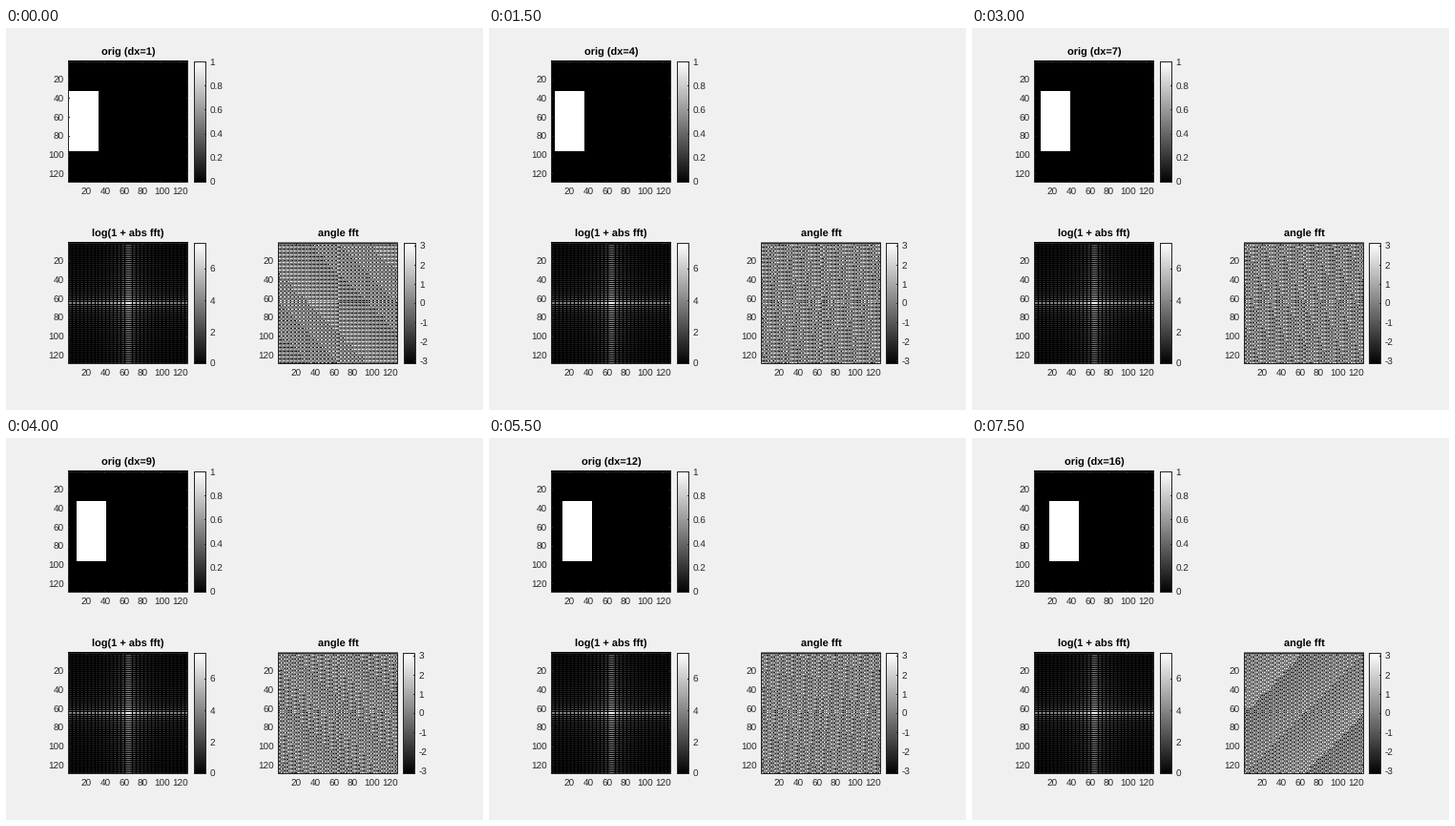
These frames come from a looping animation (500 px wide and 400 px high, 8 s). A matplotlib script:

```python
import numpy as np
import matplotlib.pyplot as plt
from matplotlib.animation import FuncAnimation

W, H, N = 500, 400, 128
STEPS, STEP_MS = 16, 500
PANEL_W, PANEL_H = 125, 126  # distance between border lines
BAR_W = 12
CELL_X, CELL_Y = 126 / N, 126.3 / N
INK = "0.15"
PT = 0.72  # points per pixel at 100 dpi

plt.rcParams.update({"font.family": "Liberation Sans", "path.snap": False,
                     "text.hinting": "none"})

fig = plt.figure(figsize=(W / 100, H / 100), dpi=100, facecolor="#f0f0f0")
ax = fig.add_axes([0, 0, 1, 1])
ax.axis("off")


def label(x, y, text, size=10, **kw):
    kw.setdefault("color", INK)
    return ax.text(x, y, text, fontsize=size * PT, va="baseline", **kw)


def line(xs, ys):
    return ax.plot(xs, ys, color=INK, lw=PT, solid_capstyle="butt",
                   solid_joinstyle="miter", zorder=3)[0]


def center(v):
    """Middle of the pixel that holds v."""
    return np.floor(v) + 0.5


def frame(x, y, w, h):
    xs = np.array([x, x + w, x + w, x, x]) + 0.5
    ys = np.array([y, y, y + h, y + h, y]) + 0.5
    return line(xs, ys)


def image(data, x, y, w, h, lo, hi):
    return ax.imshow(data, cmap="gray", vmin=lo, vmax=hi, aspect="auto",
                     interpolation="nearest", extent=(x, x + w, y + h, y))


def panel(x, y, title, lo, hi):
    """Image axes with title and tick labels; returns image and title."""
    img = image(np.zeros((N, N)), x, y - 0.1, CELL_X * N, CELL_Y * N, lo, hi)
    frame(x, y, PANEL_W, PANEL_H)
    right, bottom = x + PANEL_W, y + PANEL_H
    for v in range(20, N, 20):
        tx = x + (v - 0.5) * CELL_X
        ty = y + (v - 0.5) * CELL_Y
        for a in (y, bottom - 1):
            line([center(tx)] * 2, [a, a + 2])
        for a in (x, right - 1):
            line([a, a + 2], [center(ty)] * 2)
        label(tx + 0.3, bottom + 13.8, str(v), ha="center")
        label(x - 4.5, ty + 3.9, str(v), ha="right")
    head = label(x + PANEL_W / 2 + 0.5, y - 6, title, 11, ha="center",
                 weight="bold", color="black")
    return img, head


def colorbar(x, y, lo, hi, ticks):
    """Gray ramp with tick labels; returns its artists."""
    ramp = np.linspace(1, 0, 256)[:, None]
    parts = [image(ramp, x, y, BAR_W + 1, PANEL_H + 1, 0, 1),
             frame(x, y, BAR_W, PANEL_H)]
    for v in ticks:
        ty = y + PANEL_H * (hi - v) / (hi - lo) + 0.5
        parts.append(line([x + BAR_W - 1, x + BAR_W + 1], [center(ty)] * 2))
        parts.append(label(x + BAR_W + 4.5, ty + 3.8, f"{v:g}", ha="left"))
    return parts


def box_at(dx):
    img = np.zeros((N, N))
    img[N // 4:3 * N // 4, dx:dx + N // 4] = 1
    return img


peak = np.log1p(box_at(1).sum())
box_img, box_title = panel(65, 35, "orig (dx=1)", 0, 1)
mag_img, _ = panel(65, 225, "log(1 + abs fft)", 0, peak)
ang_img, _ = panel(285, 225, "angle fft", -np.pi, np.pi)
colorbar(197, 35, 0, 1, np.arange(6) / 5)
colorbar(197, 225, 0, peak, (0, 2, 4, 6))
first_bar, later_bar = (
    colorbar(x, 225, -np.pi, np.pi, range(-3, 4)) for x in (417, 416))

ax.set_xlim(0, W)
ax.set_ylim(H, 0)


def update(i):
    dx = i + 1
    img = box_at(dx)
    spec = np.fft.fftshift(np.fft.fft2(img))
    mag = np.abs(spec)
    box_img.set_data(img)
    mag_img.set_data(np.log1p(mag))
    ang_img.set_data(np.where(mag > 1e-9, np.angle(spec), 0))
    box_title.set_text(f"orig (dx={dx})")
    for part in first_bar:
        part.set_visible(i == 0)
    for part in later_bar:
        part.set_visible(i > 0)
    return []


anim = FuncAnimation(fig, update, frames=STEPS, interval=STEP_MS,
                     repeat=True, repeat_delay=0)
plt.show()
```
